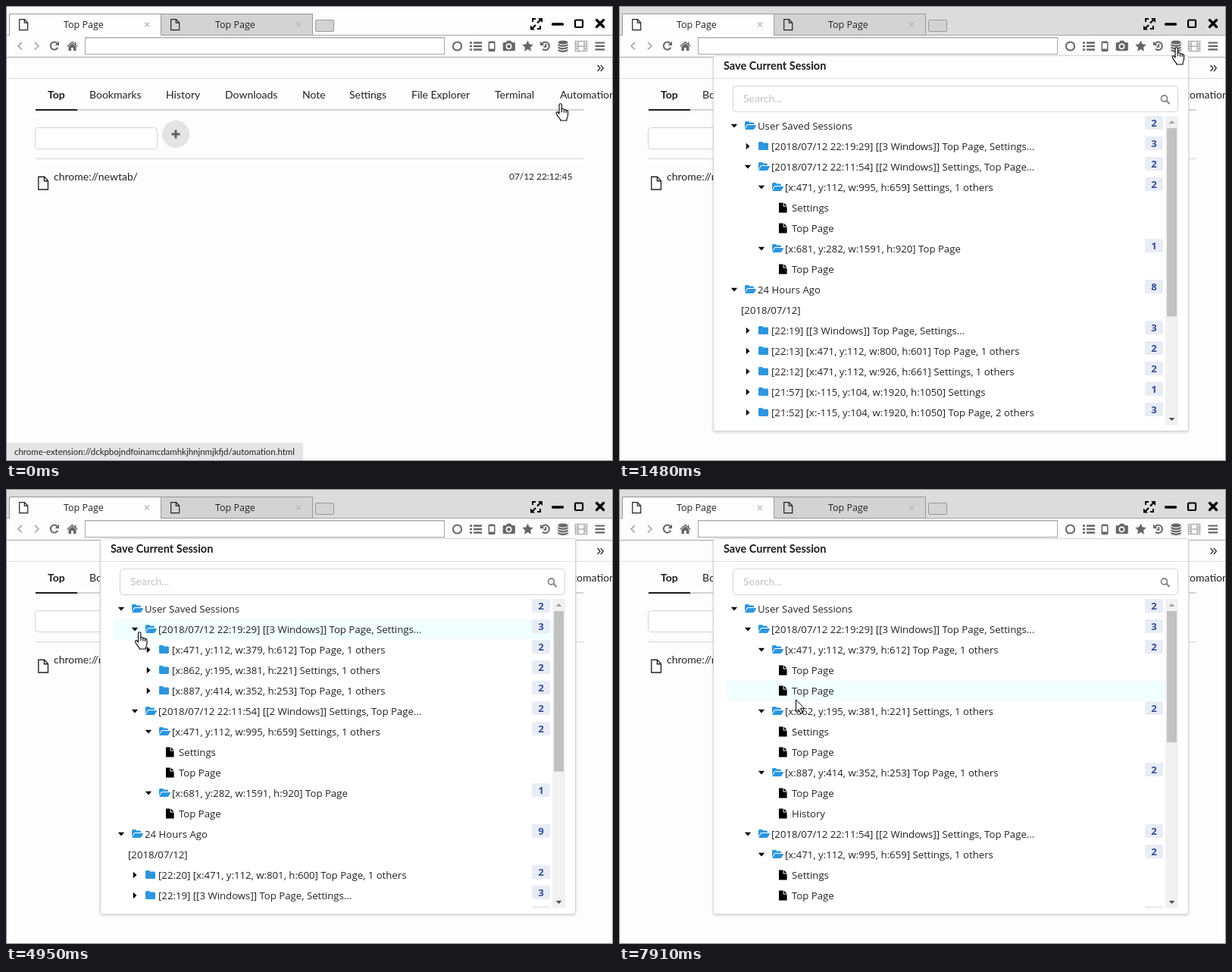
An HTML page for the animation above (8000 ms loop, 801 by 600 pixels).

```html
<!DOCTYPE html>
<html lang="en">
<head>
<meta charset="utf-8">
<title>Session manager</title>
<style>
html, body { margin: 0; width: 100%; height: 100%; overflow: hidden; background: #fdfdfd; }
svg { display: block; width: 801px; height: 600px; }
text { font: 14px Lato, sans-serif; fill: #222; white-space: pre; }
.ui, .tab, .badge { font-family: "Open Sans", "Noto Sans", sans-serif; }
.ui { font-size: 13.2px; }
.tab { font-size: 12.5px; }
.badge { font-size: 13.2px; font-weight: 700; fill: #364f97; text-anchor: middle; }
.b { font-weight: 700; fill: #1b1c1d; }
.title { font-size: 14.5px; }
.sm { font-size: 11.9px; }
.url { font-size: 11.45px; }
.hint { fill: #c3c3c3; }
.line { fill: none; stroke: #222; stroke-width: 1.2; }
.gray { fill: #666; }
.ring { fill: none; stroke: #666; stroke-width: 2; }
.pale { fill: none; stroke: #adadad; stroke-width: 1.8; }
.blue { fill: #2d96de; }
.box { fill: #fff; stroke: #d4d4d5; }
</style>
</head>
<body>
<svg viewBox="0 0 801 600">
  <defs>
    <path id="page" class="line" d="M.7.7H7.5L11.7 5V14.6H.7ZM7.3.7V5.2H11.7"/>
    <g id="open" class="blue">
      <path d="M0 9.5V1.5Q0 0 1.5 0H4.5Q6 0 6 1.5H10.5Q12 1.5 12 3V4H4.5Q3 4 2.2 5.4Z"/>
      <path d="M.5 10.2 3 6Q3.5 5 4.6 5H14.4Q15.5 5 14.9 6L12.5 10Q11.9 11 10.8 11H1Q.1 11 .5 10.2Z"/>
    </g>
    <path id="shut" class="blue" d="M0 1.5Q0 0 1.5 0H4.5Q6 0 6 1.5H11.5Q13 1.5 13 3V9.5Q13 11 11.5 11H1.5Q0 11 0 9.5Z"/>
    <path id="leaf" d="M0 0H5.6V5H10.6V13H0ZM6.6 0 10.6 4H6.6Z"/>
    <path id="down" d="M-4.2-2.2H4.2L0 2.4Z"/>
    <path id="side" d="M-2.2-4.2 2.5 0-2.2 4.2Z"/>
    <g id="hand" stroke="#000" stroke-width="1.1" stroke-linejoin="round">
      <path fill="#fff" d="M5 14V2.5a1.7 1.7 0 0 1 3.4 0V8c.4-.9 2.8-.7 3 .9.5-.8 2.6-.4 2.7 1 .6-.6 2.4-.2 2.4 1.6V16c0 2-1.5 3.5-1.5 5v2H6.5v-1.5C5 19.5 3 17.5 1.5 14.5.3 12.3 2 11 3.3 12.2Z"/>
      <path fill="none" d="M8.4 8v4.3M11.4 9v3.7M14.1 10v3"/>
    </g>
    <path id="arrow" fill="#fff" stroke="#000" d="M.5.8V17L4.2 13.4 6.7 19.2 9.1 18.2 6.6 12.4H11.7Z"/>
    <path id="beam" fill="none" stroke="#000" d="M0 .5H3L3.5 1 4 .5H7M3.5 1V15.5M0 16H3L3.5 15.5 4 16H7"/>
    <clipPath id="view"><rect x="126" y="145" width="612" height="408"/></clipPath>
    <filter id="shadow" x="-5%" y="-5%" width="110%" height="110%">
      <feDropShadow dx="0" dy="1.5" stdDeviation="1.5" flood-color="#222" flood-opacity=".18"/>
    </filter>
  </defs>

  <!-- tab strip -->
  <rect width="801" height="600" fill="#fdfdfd"/>
  <rect id="strip" width="801" height="38"/>
  <path d="M0 38.5H801" stroke="#a6a6a6"/>
  <path d="M4.5 39V10.5H204.5V39Z" fill="#fdfdfd"/>
  <path d="M4.5 39V10.5H204.5" fill="none" stroke="#999"/>
  <path d="M204.5 38.5V10.5H404.5V38.5Z" fill="#d3d3d3" stroke="#999"/>
  <rect x="408.5" y="18.5" width="24" height="15" rx="1.5" fill="#d3d3d3" stroke="#999"/>
  <use href="#page" x="17" y="17"/><use href="#page" x="217" y="17"/>
  <text class="tab" x="76" y="29">Top Page</text>
  <text class="tab" x="276" y="29">Top Page</text>
  <path d="M183 21.5l6 6m0-6-6 6M383 21.5l6 6m0-6-6 6" stroke="#b8b8b8" stroke-width="1.2"/>
  <g fill="none" stroke="#000">
    <path d="M701 22.5 706 17.5M699 25 694 30" stroke-width="2.2"/>
    <path d="M721.5 24H734.5" stroke-width="3.4" stroke-linecap="round"/>
    <rect x="751" y="18.5" width="10" height="9.5" rx="1" stroke-width="2.2"/>
    <path d="M779.5 18.5l9 9m0-9-9 9" stroke-width="3.4" stroke-linecap="round"/>
  </g>
  <path d="M702 16H708V22ZM692 25.5V31.5H698ZM699 16H694V21H696V18H699ZM701 31H706V26H704V29H701Z"/>

  <!-- toolbar -->
  <path d="M21 48l-5 4.7 5 4.7M38 48l5 4.7-5 4.7" class="pale"/>
  <path class="ring" d="M67.6 49.3A5 5 0 1 0 68.3 54.8"/>
  <path class="gray" d="M70 46.5V52H64.5Z"/>
  <path class="gray" d="M87.5 49.2 92.5 53.5V59H89V55H86V59H82.5V53.5Z"/>
  <path d="M80.8 53.3 87.5 47.5 94.2 53.3M91.7 47.5V51" fill="none" stroke="#666" stroke-width="1.5"/>
  <rect x="104.5" y="41.5" width="474" height="22" fill="#fff" stroke="#a9a9a9"/>
  <path d="M105 42.5H578" stroke="#ddd"/>
  <circle class="ring" cx="595.5" cy="53" r="5.6"/>
  <path d="M612 48.5h3m2 0h11M612 53h3m2 0h11M612 57.5h3m2 0h11" stroke="#666" stroke-width="2.4"/>
  <path class="gray" fill-rule="evenodd" d="M638 46.5h6q1.5 0 1.5 1.5v10.5q0 1.5-1.5 1.5h-6q-1.5 0-1.5-1.5V48q0-1.5 1.5-1.5ZM638 49v7.5h6V49Z"/>
  <path class="gray" d="M657 48h3l1.2-2.2h5L667.5 48h3q1.3 0 1.3 1.3v8.4q0 1.3-1.3 1.3h-13.5q-1.3 0-1.3-1.3v-8.4q0-1.3 1.3-1.3Z"/>
  <circle cx="663.5" cy="53.3" r="3.2" fill="#666" stroke="#fdfdfd" stroke-width="1.6"/>
  <path class="gray" d="M688.5 45.5 690.7 50.3 695.8 50.9 692 54.5 693 59.7 688.5 57.1 684 59.7 685 54.5 681.2 50.9 686.3 50.3Z"/>
  <path class="ring" d="M707.7 49.2A5.3 5.3 0 1 1 708 56.7M712.2 50V53.7H709.5"/>
  <path class="gray" d="M705 46.5V52H710.5Z"/>
  <rect id="hot" x="726" y="44" width="18" height="18" rx="3" fill="#efefef"/>
  <circle id="click" cx="735" cy="55" r="11.5" fill="#f6f166"/>
  <g class="gray">
    <ellipse cx="735" cy="48" rx="6.5" ry="2.6"/>
    <path id="disc" d="M728.5 50Q735 53.6 741.5 50V52.3Q735 55.8 728.5 52.3Z"/>
    <use href="#disc" y="3.5"/><use href="#disc" y="7"/>
  </g>
  <path d="M751.5 46.5H766.5V59.5H751.5ZM755 46.5V59.5M763 46.5V59.5M755 53H763M751.5 50H755M751.5 53H755M751.5 56H755M763 50H766.5M763 53H766.5M763 56H766.5" fill="none" stroke="#b0b0b0" stroke-width="1.5"/>
  <path d="M777.5 48.5h12.5m-12.5 4.4h12.5m-12.5 4.4h12.5" stroke="#666" stroke-width="2.2"/>
  <path d="M0 67.5H801" stroke="#a9a9a9"/>
  <path d="M0 95.5H801" stroke="#ddd"/>
  <path class="line" d="M780.5 78 784 82l-3.5 4M784.8 78l3.5 4-3.5 4"/>

  <!-- page -->
  <g id="nav"></g>
  <path d="M39 137H762" stroke="#d4d4d5" stroke-width="2"/>
  <path d="M39 137H94" stroke="#1b1c1d" stroke-width="2"/>
  <rect class="box" x="38.5" y="160.5" width="161" height="28" rx="4"/>
  <circle cx="224" cy="169" r="18" fill="#e4e4e4"/>
  <path d="M218.5 169h11M224 163.5v11" stroke="#606060" stroke-width="3"/>
  <path d="M39 201.5H762" stroke="#d4d4d5"/>
  <use href="#page" transform="translate(42 224.5) scale(1.15 1.2)"/>
  <text x="63" y="230">chrome://newtab/</text>
  <text class="sm" x="664" y="229">07/12 22:12:45</text>
  <g id="status">
    <rect y="576" width="392" height="24" fill="#e5e5e5"/>
    <text class="url" x="11" y="592">chrome-extension://dckpbojndfoinamcdamhkjhnjnmjkfjd/automation.html</text>
  </g>

  <!-- popup -->
  <g id="popup">
    <rect class="box" x="124.5" y="65.5" width="627" height="495" rx="3" filter="url(#shadow)"/>
    <rect id="head" x="125" y="66" width="626" height="26" fill="#f2f2f2"/>
    <path d="M125 95.5H751" stroke="#e0e0e0"/>
    <text class="b title" x="138" y="84">Save Current Session</text>
    <rect class="box" x="150.5" y="105.5" width="587" height="34" rx="4"/>
    <text class="hint" x="164" y="127">Search...</text>
    <circle cx="719.5" cy="122" r="4" fill="none" stroke="#888" stroke-width="1.8"/>
    <path d="M722.5 125l3.5 3.5" stroke="#888" stroke-width="2.2" stroke-linecap="round"/>
    <g id="tree" clip-path="url(#view)"></g>
    <rect x="721" y="145" width="17" height="408" fill="#f1f1f1"/>
    <rect id="thumb" x="723" y="161" width="13" fill="#c1c1c1"/>
    <path d="M725.5 155h8l-4-4Z" fill="#a3a3a3"/>
    <path d="M725.5 543h8l-4 4Z" fill="#505050"/>
  </g>
  <use id="cursor"/>
  <rect x=".5" y=".5" width="800" height="599" fill="none" stroke="#8f8f8f"/>
</svg>
<script>
const $ = id => document.getElementById(id);
const ROW = 27, TOP = 158;

const tabs = { Bookmarks: 110, History: 211, Downloads: 289, Note: 391, Settings: 453,
  "File Explorer": 535, Terminal: 645, Automation: 731 };
$("nav").innerHTML = '<text class="b" x="55" y="122">Top</text>' +
  Object.entries(tabs).map(([name, x]) => `<text x="${x}" y="122">${name}</text>`).join("");

const row = (kind, depth, label, count) => ({ kind, depth, label, count });
const leaves = names => names.map(name => row("leaf", 3, name));
const win = (label, count, names, isOpen) =>
  [row(isOpen ? "open" : "shut", 2, label, count), ...(isOpen ? leaves(names) : [])];

// level 0: saved session closed; 1: opened; 2 to 4: its windows opened one by one
function listRows(level, logged) {
  const T = "Top Page", S = "Settings";
  const recent = [
    ["[22:20] [x:471, y:112, w:801, h:600] Top Page, 1 others", 2],
    ["[22:19] [[3 Windows]] Top Page, Settings...", 3],
    ["[22:13] [x:471, y:112, w:800, h:601] Top Page, 1 others", 2],
    ["[22:12] [x:471, y:112, w:926, h:661] Settings, 1 others", 2],
    ["[21:57] [x:-115, y:104, w:1920, h:1050] Settings", 1],
    ["[21:52] [x:-115, y:104, w:1920, h:1050] Top Page, 2 others", 3]
  ].slice(logged ? 0 : 1);
  return [
    row("open", 0, "User Saved Sessions", 2),
    row(level ? "open" : "shut", 1, "[2018/07/12 22:19:29] [[3 Windows]] Top Page, Settings...", 3),
    ...(level ? [
      ...win("[x:471, y:112, w:379, h:612] Top Page, 1 others", 2, [T, T], level > 1),
      ...win("[x:862, y:195, w:381, h:221] Settings, 1 others", 2, [S, T], level > 2),
      ...win("[x:887, y:414, w:352, h:253] Top Page, 1 others", 2, [T, "History"], level > 3)
    ] : []),
    row("open", 1, "[2018/07/12 22:11:54] [[2 Windows]] Settings, Top Page...", 2),
    ...win("[x:471, y:112, w:995, h:659] Settings, 1 others", 2, [S, T], true),
    ...win("[x:681, y:282, w:1591, h:920] Top Page", 1, [T], true),
    row("open", 0, "24 Hours Ago", logged ? 9 : 8),
    row("date", 0, "[2018/07/12]"),
    ...recent.map(([label, count]) => row("shut", 1, label, count))
  ];
}

function drawRow({ kind, depth, label, count }, i) {
  const y = TOP + ROW * i, x = 152 + 18 * depth;
  const text = tx => `<text class="ui" x="${tx}" y="${y + 5}">${label}</text>`;
  if (kind === "date") return text(161);
  if (kind === "leaf") return `<use href="#leaf" x="211" y="${y - 6.5}"/>` + text(228);
  const mark = kind === "open" ? "down" : "side";
  return `<use href="#${mark}" x="${x}" y="${y}"/><use href="#${kind}" x="${x + 14}" y="${y - 6}"/>` +
    text(x + 31) +
    `<rect x="694" y="${y - 13}" width="24" height="18" rx="2" fill="#e8ecf5"/>` +
    `<text class="badge" x="706" y="${y + 1}">${count}</text>`;
}

function drawTree(level, logged, hover) {
  const rows = listRows(level, logged);
  const glow = hover < 0 ? "" :
    `<rect x="142" y="${TOP + ROW * hover - 13}" width="579" height="26" fill="#f0ffff"/>`;
  $("tree").innerHTML = glow + rows.map(drawRow).join("");
  const content = 646 + (rows.length - listRows(0, true).length) * ROW;
  $("thumb").setAttribute("height", 409 * 376 / content);
}

// start, pointer, x, y, opened level (-1: popup hidden), hovered row
const steps = [
  [0, "hand", 725, 128, -1, -1],
  [500, "hand", 729, 54, -1, -1],
  [990, "hand", 729, 54, -1, -1],
  [1480, "hand", 729, 54, 0, -1],
  [1960, "hand", 729, 54, 0, -1],
  [2470, "hand", 669, 73, 0, -1],
  [2950, "beam", 439, 126, 0, -1],
  [3460, "hand", 216, 187, 0, 1],
  [4450, "hand", 169.5, 188, 0, 1],
  [4950, "hand", 169.5, 188, 1, 1],
  [5430, "hand", 177, 209, 1, 2],
  [5940, "hand", 187, 213, 2, 2],
  [6440, "hand", 180, 288, 2, 5],
  [6940, "hand", 188, 359, 3, 7],
  [7440, "hand", 182, 380, 3, 8],
  [7910, "arrow", 233, 277, 4, 4]
];
const show = (id, on) => $(id).style.display = on ? "" : "none";

function apply([t, pointer, x, y, level, hover]) {
  show("status", t < 500);
  show("hot", t >= 500);
  show("click", t === 990);
  show("popup", level >= 0);
  show("head", t === 2470);
  $("strip").setAttribute("fill", t < 990 ? "#fdfdfd" : "#dcdcdc");
  if (level >= 0) drawTree(level, t >= 1960, hover);
  const cursor = $("cursor");
  cursor.setAttribute("href", "#" + pointer);
  cursor.setAttribute("x", x);
  cursor.setAttribute("y", y);
}

const begin = performance.now();
let current;
function tick() {
  const t = (performance.now() - begin) % 8000;
  const step = steps.findLast(s => s[0] <= t) || steps[0];
  if (step !== current) apply(current = step);
  requestAnimationFrame(tick);
}
tick();
</script>
</body>
</html>
```
